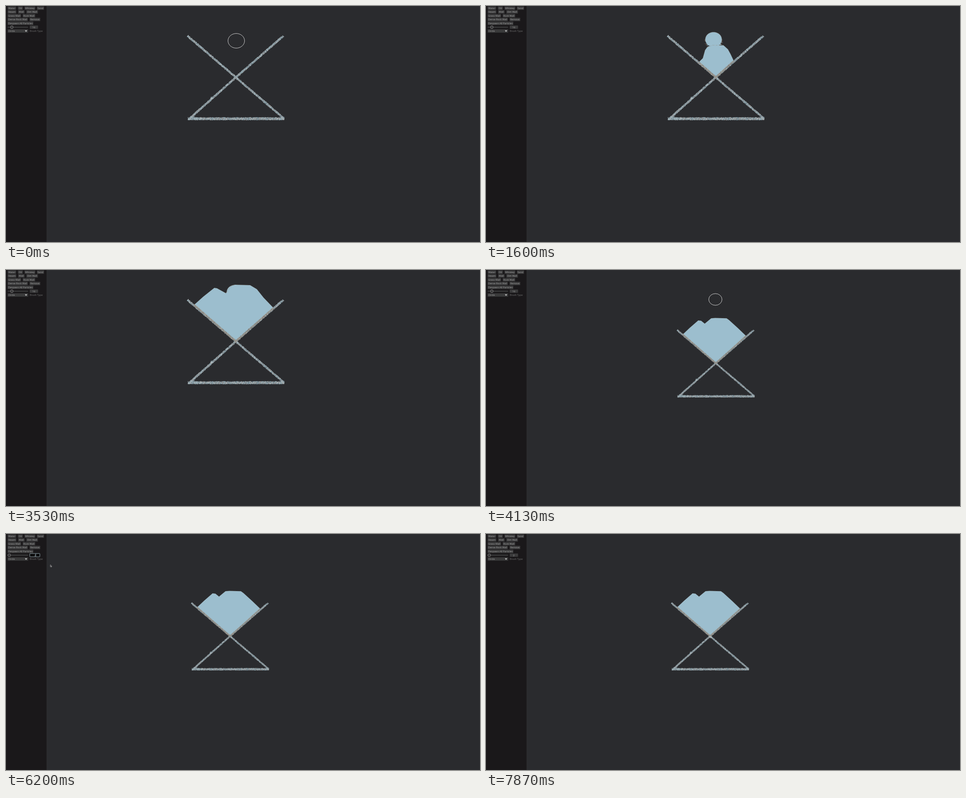
Recreate the animation shown at these times as an HTML page with a canvas. Size 1058 px wide and 529 px high, loop 8000 ms.

```html
<!DOCTYPE html>
<html lang="en">
<head>
<meta charset="utf-8">
<title>Falling sand hourglass</title>
<style>
html, body { margin: 0; width: 100%; height: 100%; overflow: hidden; background: #2a2b2e; }
canvas, svg { position: absolute; left: 0; top: 0; width: 1058px; height: 529px; }
text { font: 5.5px "Open Sans", "Noto Sans", sans-serif; fill: #a2a2a2; }
</style>
</head>
<body>
<canvas id="scene" width="1058" height="529"></canvas>
<svg viewBox="0 0 1058 529">
  <rect width="91" height="529" fill="#1a181a"/>
  <path d="M91 0V529" stroke="#343436" stroke-width=".7"/>
  <g id="buttons"></g>
  <rect x="3.5" y="46.2" width="46" height="2.6" rx="1.2" fill="#3a3a3b"/>
  <circle id="handle" cy="47.5" r="3.2" fill="#353536" stroke="#a0a0a0" stroke-width=".7"/>
  <rect id="field" y="43.7" height="7.4" rx=".8"/>
  <text id="value" y="49.5" text-anchor="middle"></text>
  <path id="caret" d="M66.4 44.4V50.6" stroke="#c0deec" stroke-width=".8"/>
  <rect x="3.5" y="52.3" width="46" height="7.4" rx=".8" fill="#3a3a3b"/>
  <text x="5.5" y="58">Circle</text>
  <path d="M42.2 54.5H47.2L44.7 58.2Z" fill="#c4c4c4"/>
  <text x="53" y="58" style="fill:#777">Brush Type</text>
  <ellipse id="ring" fill="none" stroke="#e0e0e0" stroke-width=".9"/>
  <path id="arrow" d="M0 0V4.6L1.2 3.6L2 5.2L2.7 4.8L2 3.3H3.4Z" fill="#222" stroke="#ddd" stroke-width=".6"/>
</svg>
<script>
const LOOP = 8000, APEX = [513, 160], SLOPE = 0.862;
const POUR_START = 650, POUR_END = 3570, EDIT_START = 5050, TYPED = 5550, EDIT_END = 7860;
const SAND = '#9cbece', BROWN = '#7d6b5b';
const $ = id => document.getElementById(id);
const ctx = $('scene').getContext('2d');

// Each track row: time, then values.
const cameraTrack = [
  [0, 513, 160, 1], [3640, 513, 160, 1], [3900, 513, 209, .8],
  [4150, 513, 209, .8], [4350, 500.3, 229, .8]
];
const brushTrack = [
  [0, 514, 78], [700, 514, 78], [1300, 520, 76], [1600, 508, 75], [2250, 455, 55],
  [2400, 456, 53], [2650, 460, 53], [3050, 540, 51], [3530, 511, 50], [3640, 511, 50],
  [4130, 512, 66], [4180, 512, 66], [4350, 499, 86], [4900, 62, 47], [5750, 62, 47],
  [6200, 99, 69], [6500, 104, 73], [7400, 500.5, 231]
];
// Pile surface from the left wall to the right wall, as x, y pairs.
const pileTrack = [
  [1600, 475,126, 484,117, 489,99, 494,92, 500,90, 505,88, 512,88, 530,88, 540,97, 546,108, 553,123],
  [2400, 441,94, 442,85, 446,70, 455,50, 472,43, 490,52, 500,60, 520,77, 535,90, 550,103, 563,114],
  [3530, 420,78, 440,60, 465,40, 471,41, 491,52, 503,36, 511,33, 545,34, 560,43, 575,62, 597,85],
  [3650, 421,79, 440,61, 464,40, 472,41, 482,49, 500,34, 511,33, 543,34, 550,39, 575,62, 597,83]
];

function sample(track, t) {
  const i = track.findIndex(row => row[0] > t);
  if (i < 0) return track[track.length - 1].slice(1);
  if (i === 0) return track[0].slice(1);
  const a = track[i - 1], b = track[i], k = (t - a[0]) / (b[0] - a[0]);
  return a.slice(1).map((v, j) => v + (b[j + 1] - v) * k);
}

function rng(seed) {
  return () => {
    seed = (seed + 0x6D2B79F5) | 0;
    let n = Math.imul(seed ^ (seed >>> 15), 1 | seed);
    n ^= n + Math.imul(n ^ (n >>> 7), 61 | n);
    return ((n ^ (n >>> 14)) >>> 0) / 4294967296;
  };
}

function makeWalls() {
  const wall = document.createElement('canvas'), g = wall.getContext('2d'), rand = rng(12);
  wall.width = 1058;
  wall.height = 300;
  const colors = ['#b8c9cf', '#83a5b3', '#9b918b', '#6f828c', '#cbd1d1', '#596269', '#93b4be', '#a8a1a0'];
  const strip = (x0, y0, x1, y1, width) => {
    const len = Math.hypot(x1 - x0, y1 - y0), nx = (y0 - y1) / len, ny = (x1 - x0) / len;
    g.strokeStyle = '#7c8b92';
    g.lineWidth = width - 1;
    g.beginPath();
    g.moveTo(x0, y0);
    g.lineTo(x1, y1);
    g.stroke();
    for (let i = 0; i < len * width * 1.3; i++) {
      const u = rand(), v = (rand() - .5) * width;
      g.fillStyle = colors[rand() * colors.length | 0];
      g.fillRect(x0 + (x1 - x0) * u + nx * v - .5, y0 + (y1 - y0) * u + ny * v - .5, 1.1, 1);
    }
  };
  strip(405, 67, 513, 160, 4.6);
  strip(513, 160, 619.5, 251.5, 4.6);
  strip(619, 67, 513, 160, 4.6);
  strip(513, 160, 410, 252, 4.6);
  strip(406, 252.7, 621, 252.7, 6);
  strip(412, 249.5, 421, 249.5, 4);
  strip(457, 206, 462, 206, 4);
  strip(509, 160, 517, 160, 5);
  return wall;
}
const walls = makeWalls();

function trace(points) {
  ctx.beginPath();
  for (let i = 0; i < points.length; i += 2) ctx.lineTo(points[i], points[i + 1]);
}

function drawPile(t) {
  const grow = Math.sqrt(Math.min(1, Math.max(0, (t - 850) / 750)));
  if (!grow) return null;
  const pile = sample(pileTrack, t).map((v, i) => APEX[i % 2] + (v - APEX[i % 2]) * grow);
  trace([...pile, ...APEX]);
  ctx.fillStyle = SAND;
  ctx.fill();
  trace(pile);
  ctx.strokeStyle = 'rgba(139,112,83,.75)';
  ctx.lineWidth = .7;
  ctx.setLineDash([2, 1.5, 1, 3]);
  ctx.stroke();
  ctx.setLineDash([]);
  return pile;
}

// Sand below the brush trails behind it, since deeper rows left it earlier.
function drawStream(t) {
  const [bx, by] = sample(brushTrack, t), rand = rng(Math.floor(t * .015));
  const bottom = Math.min(160, by + (t - POUR_START) / 4);
  for (let y = by; y < bottom; y++) {
    const x = sample(brushTrack, t - (y - by) * 4)[0];
    const rough = Math.min(10, (y - by) * .7);
    const left = x - 18 + rand() * rough, right = x + 18 - rand() * rough;
    ctx.fillStyle = BROWN;
    ctx.fillRect(left - 1.5 - rand() * 2, y, 2.5, .8);
    ctx.fillRect(right - 1, y, 2 + rand() * 2, .8);
    ctx.fillStyle = SAND;
    ctx.fillRect(left, y, right - left, 1.1);
  }
  ctx.beginPath();
  ctx.ellipse(bx, by, 18.5, 16.5, 0, 0, 7);
  ctx.fillStyle = SAND;
  ctx.fill();
  ctx.beginPath();
  ctx.ellipse(bx, by, 18.5, 16.5, 0, Math.PI, 2 * Math.PI);
  ctx.strokeStyle = 'rgba(125,107,91,.7)';
  ctx.lineWidth = .6;
  ctx.stroke();
}

function drawScene(t) {
  const [ax, ay, s] = sample(cameraTrack, t);
  ctx.setTransform(1, 0, 0, 1, 0, 0);
  ctx.fillStyle = '#2a2b2e';
  ctx.fillRect(0, 0, 1058, 529);
  ctx.setTransform(s, 0, 0, s, ax - APEX[0] * s, ay - APEX[1] * s);
  ctx.save();
  const rim = APEX[1] - 108 * SLOPE;
  trace([405, -50, 405, rim, ...APEX, 621, rim, 621, -50]);
  ctx.clip();
  if (t >= POUR_START && t < POUR_END) drawStream(t);
  const pile = drawPile(t);
  ctx.restore();
  ctx.drawImage(walls, 0, 0);
  if (pile) {
    trace([pile[0], pile[1], ...APEX, ...pile.slice(-2)]);
    ctx.strokeStyle = 'rgba(151,126,104,.38)';
    ctx.lineWidth = 4;
    ctx.stroke();
  }
  return s;
}

function drawPanel(t, zoom) {
  const typed = t >= TYPED, editing = t >= EDIT_START && t < EDIT_END;
  const set = (id, attrs) => {
    for (const key in attrs) $(id).setAttribute(key, attrs[key]);
  };
  set('handle', { cx: typed ? 7.2 : 13 });
  set('field', {
    x: 53, width: editing ? 22.6 : 18.5, fill: editing ? '#0b0b0c' : '#3a3a3b',
    stroke: editing ? '#b4c9d2' : 'none', 'stroke-width': .8
  });
  set('value', { x: editing ? (typed ? 64.6 : 63) : 62.2 });
  $('value').textContent = typed ? '2' : '16';
  set('caret', { visibility: editing ? 'visible' : 'hidden' });

  const [x, y] = sample(brushTrack, t), size = zoom * (typed ? 2 / 16 : 1);
  const pouring = t >= POUR_START && t < POUR_END, arrow = x < 106;
  set('ring', {
    cx: x, cy: y, rx: 18.5 * size, ry: 16.4 * size,
    visibility: pouring || arrow ? 'hidden' : 'visible'
  });
  set('arrow', { transform: `translate(${x} ${y})`, visibility: arrow ? 'visible' : 'hidden' });
}

function addButton(label, x, y, width) {
  $('buttons').insertAdjacentHTML('beforeend',
    `<rect x="${x}" y="${y - 3.7}" width="${width}" height="7.4" rx=".8" fill="#3a3a3b"/>
     <text x="${x + width / 2}" y="${y + 2}" text-anchor="middle">${label}</text>`);
}
[
  ['Water', 3.5, 4.7, 19], ['Oil', 26.5, 4.7, 11], ['Whiskey', 41.3, 4.7, 24], ['Sand', 69, 4.7, 16],
  ['Steam', 3.5, 13.2, 19.5], ['Wall', 27, 13.2, 14.5], ['Dirt Wall', 45.3, 13.2, 26],
  ['Grass Wall', 3.5, 21.7, 30], ['Rock Wall', 37.2, 21.7, 28],
  ['Dense Rock Wall', 3.5, 30.2, 45], ['Remove', 52.5, 30.2, 24],
  ['Despawn All Particles', 3.5, 38.8, 57.5]
].forEach(button => addButton(...button));

const start = performance.now();
function frame() {
  const t = (performance.now() - start) % LOOP;
  drawPanel(t, drawScene(t));
  requestAnimationFrame(frame);
}
frame();
</script>
</body>
</html>
```
